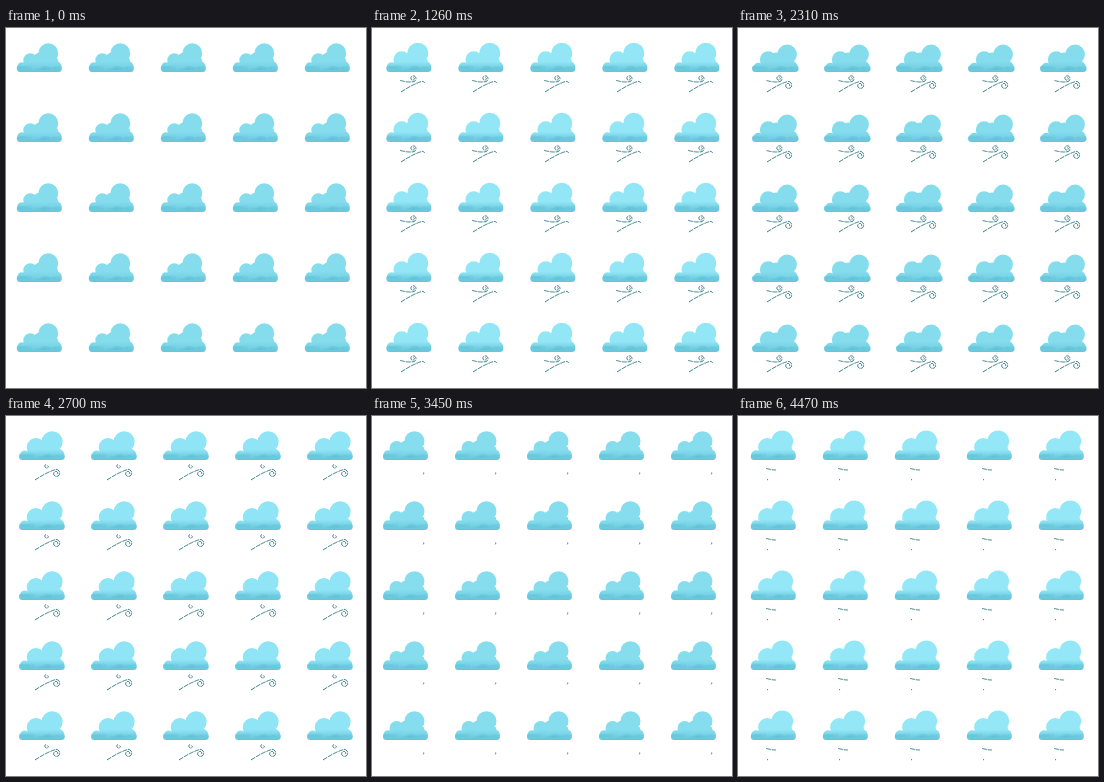
Animation of 360 by 360 pixels, one loop 4.5 s. Source, as an HTML page with a canvas:

```html
<!DOCTYPE html>
<html lang="en">
<head>
<meta charset="utf-8">
<title>Windy clouds</title>
<style>
html, body { margin: 0; width: 100%; height: 100%; overflow: hidden; background: #fff; }
canvas { display: block; width: 360px; height: 360px; }
</style>
</head>
<body>
<canvas id="stage" width="360" height="360"></canvas>
<script>
const LOOP = 4500, CYCLE = 3600, STEP = 30;
const CELL_W = 72, CELL_H = 70, GRID = 5;
const FLOOR = 44;
const TAU = Math.PI * 2;

const stage = document.getElementById('stage').getContext('2d');
const cell = document.createElement('canvas');
cell.width = CELL_W;
cell.height = CELL_H;
const ctx = cell.getContext('2d');

const mix = (a, b, u) => a + (b - a) * u;
const smooth = u => u * u * (3 - 2 * u);
const progress = (t, [from, to]) => smooth(Math.min(1, Math.max(0, (t - from) / (to - from))));

const gusts = [
  { path: gust([28, 52.3], [35, 54.5], [41, 50.4], 3.4, -1), grow: [600, 1260], fade: [2250, 2950] },
  { path: gust([29, 64], [42, 55.5], [50.2, 57.4], 4, 1), grow: [820, 1650], fade: [2950, 3550] }
];

// A bent line that runs into a spiral; turn is 1 for clockwise, -1 for counterclockwise.
function gust(start, bend, centre, radius, turn) {
  const samples = 24, path = [];
  const entry = [centre[0], centre[1] - turn * radius];
  for (let i = 0; i < samples; i++) {
    const u = i / samples;
    path.push([0, 1].map(k => mix(mix(start[k], bend[k], u), mix(bend[k], entry[k], u), u)));
  }
  for (let i = 0; i <= samples; i++) {
    const u = i / samples;
    const angle = turn * (u * 1.4 * TAU - TAU / 4);
    const r = radius * (1 - 0.7 * u);
    path.push([centre[0] + r * Math.cos(angle), centre[1] + r * Math.sin(angle)]);
  }
  return path;
}

function seeded(seed) {
  return () => (seed = seed * 16807 % 2147483647) / 2147483647;
}

function cloudOutline(swell, split) {
  const outline = new Path2D();
  const lobe = (x, y, r) => {
    outline.moveTo(x + r, y);
    outline.arc(x, y, r, 0, TAU);
  };
  const half = 22.5 + 0.8 * split;
  outline.roundRect(-half, 36.8 + 0.4 * split, half * 2, FLOOR - 36.8 - 0.4 * split, 3.5);
  lobe(-17.2, 39 + 0.3 * split, 4.8 - 0.3 * split);
  lobe(-9 + 3 * swell, 32.2 - 0.9 * swell, 7 + 2.2 * swell);
  lobe(1, 32, 7.5);
  lobe(9 + 2.8 * split, 25.2 + 1.2 * split, 10 + 0.8 * swell - 0.7 * split);
  lobe(12, 34, 7);
  lobe(17.3, 38.6, 5.1);
  return outline;
}

function drawCloud(phase) {
  const swell = Math.sin(phase) ** 2;
  const split = Math.max(0, Math.cos(phase - 0.64 * TAU)) ** 3;
  const light = Math.min(1, 1.4 * swell * (1 - split));
  const tint = `rgb(${mix(132, 147, light)}, ${mix(220, 231, light)}, ${mix(237, 247, light)})`;
  const wash = ctx.createLinearGradient(0, 15, 0, FLOOR);
  wash.addColorStop(0, tint);
  wash.addColorStop(0.65, tint);
  wash.addColorStop(0.82, '#79d3e5');
  wash.addColorStop(1, '#66c4d8');

  ctx.save();
  ctx.translate(33.3 + 2.35 * (1 - Math.cos(phase)) - 0.25 * Math.sin(phase), 0);
  ctx.clip(cloudOutline(swell, split));
  ctx.fillStyle = wash;
  ctx.fillRect(-30, 0, 60, CELL_H);

  // Watercolour blotches along the base.
  const random = seeded(71);
  ctx.fillStyle = 'rgba(88, 187, 209, 0.2)';
  for (let i = 0; i < 9; i++) {
    ctx.beginPath();
    ctx.ellipse(mix(-20, 20, random()), mix(38, 42, random()), mix(3, 8, random()), mix(1, 2.5, random()), 0, 0, TAU);
    ctx.fill();
  }
  ctx.restore();
}

function drawGust(t, { path, grow, fade }) {
  const last = path.length - 1;
  const from = Math.round(last * progress(t, fade));
  const to = Math.round(last * progress(t, grow));
  if (to <= from) return;
  ctx.beginPath();
  path.slice(from, to + 1).forEach(p => ctx.lineTo(...p));
  ctx.stroke();
}

function draw(time) {
  const t = time % CYCLE;
  ctx.clearRect(0, 0, CELL_W, CELL_H);
  drawCloud(t / CYCLE * TAU);
  ctx.strokeStyle = '#2a747b';
  ctx.lineWidth = 0.95;
  ctx.setLineDash([5, 0.9]);
  gusts.forEach(g => drawGust(t, g));

  stage.fillStyle = '#fff';
  stage.fillRect(0, 0, 360, 360);
  for (let row = 0; row < GRID; row++) {
    for (let col = 0; col < GRID; col++) stage.drawImage(cell, col * CELL_W, row * CELL_H);
  }
}

const start = performance.now();
function tick() {
  const time = (performance.now() - start) % LOOP;
  draw(Math.floor(time / STEP) * STEP);
  requestAnimationFrame(tick);
}
tick();
</script>
</body>
</html>
```
